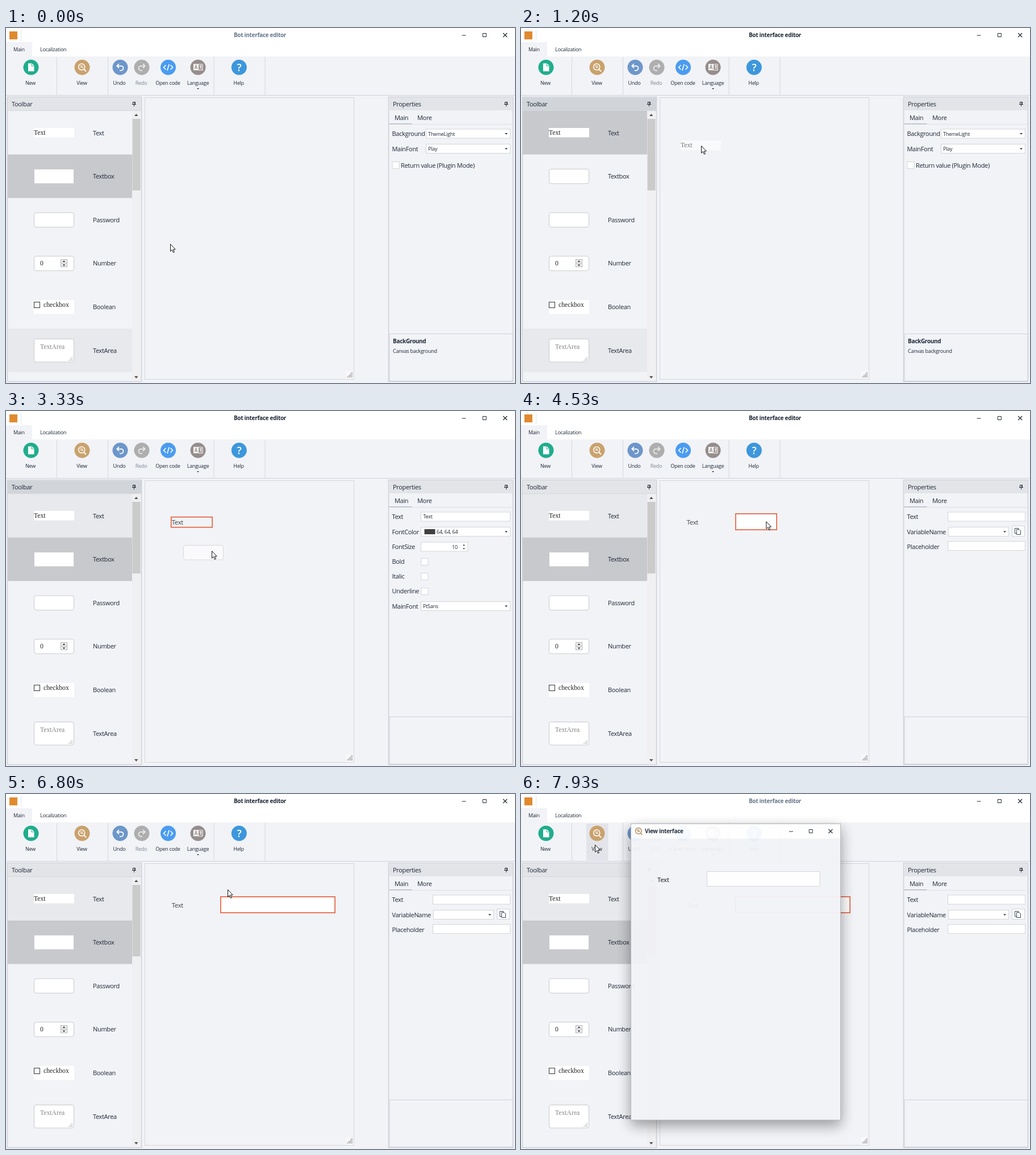
An HTML page that plays this animation: 896x625 px, repeating every 8 s.

```html
<!DOCTYPE html>
<html lang="en">
<head>
<meta charset="utf-8">
<title>Bot interface editor</title>
<style>
html, body { margin: 0; width: 100%; height: 100%; overflow: hidden; background: #f2f3f7; }
svg { display: block; width: 896px; height: 625px; }
text { font: 11px "Open Sans", "Noto Sans", sans-serif; letter-spacing: -.03em; fill: #1e2836; white-space: pre; }
.s { font-size: 9px; }
.b { font-size: 10px; font-weight: 700; }
.m { text-anchor: middle; }
.dim { fill: #66768b; }
.off { fill: #7d8490; }
.serif { font: 11.7px "Liberation Serif", "Times New Roman", serif; letter-spacing: 0; fill: #222; }
.gray { fill: #858585; }
.label { font-size: 11.4px; fill: #404040; }
.win { filter: drop-shadow(0 9px 12px rgba(0, 0, 0, .4)); }
</style>
</head>
<body>
<svg id="stage" viewBox="0 0 896 625"></svg>
<script>
const STEPS = 120, RATE = 15;
const BG = '#f2f3f7', LINE = '#d0d2d9', FIELD = '#d3d5da', ACCENT = '#e56a4b', INK = '#1e2836';

// [step, x, y] of the pointer, [step, x] of the dragged right edge
const pointerPath = [
  [0, 289, 380], [1, 272, 340], [2, 228, 255], [3, 180, 182], [4, 157, 161], [5, 153, 184],
  [9, 153, 184], [11, 169, 188], [15, 280, 203], [18, 317, 207], [22, 322, 207], [27, 327, 203],
  [36, 327, 203], [41, 215, 208], [44, 184, 256], [47, 185, 258], [48, 222, 258], [49, 292, 255],
  [50, 362, 246], [52, 398, 222], [58, 428, 193], [66, 428, 193], [74, 441, 198], [77, 441, 198],
  [79, 452, 198], [87, 559, 199], [90, 571, 199], [93, 578, 200], [95, 576, 208], [99, 500, 198],
  [102, 390, 168], [103, 279, 136], [104, 228, 112], [107, 160, 94], [112, 130, 89]
];
const edgePath = [[79, 451], [87, 558], [90, 570], [93, 580]];

function along(keys, n) {
  const i = keys.findIndex(k => k[0] > n);
  if (i === 0) return keys[0].slice(1);
  if (i < 0) return keys[keys.length - 1].slice(1);
  const a = keys[i - 1], b = keys[i], f = (n - a[0]) / (b[0] - a[0]);
  return a.slice(1).map((v, j) => v + (b[j + 1] - v) * f);
}

const text = (x, y, s, cls = '') => `<text x="${x}" y="${y}" class="${cls}">${s}</text>`;
const fill = (x, y, w, h, c) => `<rect x="${x}" y="${y}" width="${w}" height="${h}" fill="${c}"/>`;
const box = (x, y, w, h, c = '#fff', line = FIELD, r = 0, sw = 1) =>
  `<rect x="${x + .5}" y="${y + .5}" width="${w - 1}" height="${h - 1}" rx="${r}" fill="${c}" stroke="${line}" stroke-width="${sw}"/>`;
const path = (d, c = INK, w = 1, f = 'none') => `<path d="${d}" stroke="${c}" stroke-width="${w}" fill="${f}"/>`;
const shape = (d, c = INK) => path(d, 'none', 0, c);
const disc = (x, c, icon) => `<g transform="translate(${x} 69.3)"><circle r="13.5" fill="${c}"/>${icon}</g>`;
const group = (x, y, s, o = 1) => `<g transform="translate(${x} ${y})" opacity="${o}">${s}</g>`;
const down = (x, y, w = 2.5) => shape(`M${x - w} ${y}h${2 * w}l${-w} ${w}z`);
const up = (x, y, w = 2.5) => shape(`M${x - w} ${y}h${2 * w}l${-w} ${-w}z`);
const pin = x => path(`M${x - 2} 130.5h5M${x - 3} 134.5h7M${x + .5} 135v3M${x - 1.5} 130v4M${x + 1.5} 130v4M${x + 2.2} 130v4`);
const grip = (x, y, n, c) => {
  let s = '';
  for (let i = 0; i < n; i++) for (let j = 0; j <= i; j++) s += fill(x - 2.5 * j, y - 2.5 * (n - 1 - i), 1.3, 1.3, c);
  return s;
};
const combo = (x, y, w, s, indent = 4) => box(x, y, w, 17) + text(x + indent, y + 12, s, 's') + down(x + w - 7.5, y + 7.5);
const check = (x, y) => box(x, y, 13, 13);
const winButtons = (x, y, gap) => path(`M${x - 3.5} ${y + .5}h7M${x + gap - 3} ${y - 3}h6v6h-6z`) +
  path(`M${x + 2 * gap - 3.5} ${y - 3.5}l7 7m0 -7l-7 7`, INK, 1.2);
const lens = path('M3.4 3.6L7 7.2', '#fff', 2) + '<circle cx="-.8" cy="-.8" r="5.5" fill="none" stroke="#fff" stroke-width="1.5"/>' +
  path('M-3.5 -2.5h4.5M-2.5 0h4.5', '#fff', 1.2);
const turn = path('M-5.5 -2.5H1.5A4 4 0 0 1 1.5 5.5H-1', '#fff', 1.8) + path('M-2 -6.2L-5.7 -2.5L-2 1.2', '#fff', 1.8);

function ribbon(n, away) {
  const hot = n >= 108;
  let s = fill(0, 0, 896, 50, '#fff') + fill(0, 25, 46, 25, BG) +
    fill(6, 6, 14, 14, '#e08a2f') + fill(26, 3, 1, 20, '#e3e4e8') +
    text(447, 16, 'Bot interface editor', 'b m' + (away ? ' dim' : '')) + winButtons(806, 12.5, 36.3) +
    text(13, 41, 'Main', 's') + text(60, 41, 'Localization', 's') + fill(0, 118, 896, 1, LINE);
  if (hot) s += fill(115, 52, 38.5, 65, '#e3e4e9');
  for (const x of [89, 179, 365.5, 455.5]) s += fill(x, 51, 1, 67, '#d6d8dd');
  s += disc(44, '#20ad8d', shape('M-5 -7H1.5L5.5 -3V7H-5z', '#fff') + path('M1 -6.5V-2.5H5', '#20ad8d', 1)) +
    disc(134, '#c9a26d', lens) + disc(201, '#6d96ca', turn) +
    disc(239, '#aeaeae', `<g transform="scale(-1 1)" opacity=".75">${turn}</g>`) +
    disc(285.5, '#4a9cf0', path('M-4 -4L-8 0L-4 4M4 -4L8 0L4 4M1.6 -5.5L-1.6 5.5', '#fff', 1.6)) +
    disc(338, '#968d8c', fill(-8, -6, 9, 11, '#fff') + path('M-6 3L-3.5 -4L-1 3M-5 1h3', '#968d8c', 1.2) +
      path('M1 -5.5H8V5H1M2.5 -2.5H7M4.7 -4V-2.5M6 -2Q5 2 2.5 3M3.3 -2Q4.5 2 7 3', '#fff', 1)) +
    disc(410.3, '#3d97dc', '<text y="6.3" class="m" style="font-size:18px;font-weight:600;fill:#fff">?</text>');
  [[43, 'New'], [133.5, 'View'], [199.5, 'Undo'], [238, 'Redo', ' off'], [285, 'Open code'], [338, 'Language'], [409.5, 'Help']]
    .forEach(([x, name, cls = '']) => s += text(x, 100, name, 's m' + cls));
  return s + down(338, 106, 2);
}

function toolbar(n) {
  const active = (n >= 8 && n < 36) || (n >= 45 && n < 66);
  const picked = n >= 8 && n < 45 ? 0 : 1, hover = n < 41 ? 5 : 0;
  const top = i => 146 + 76.65 * i;
  let s = box(2, 121, 237, 502, BG, LINE, 0, 1.6) + fill(3, 122.5, 235, 23, active ? '#d1d5da' : '#e3e4e8') +
    fill(3, 145, 235, 1, '#d5d7dc') + text(10, 137.5, 'Toolbar') + pin(225) +
    fill(3, top(hover), 219, 76.5, '#e8e9ec') + fill(3, top(picked), 219, 76.65, '#c8c9cd') +
    fill(222, 146, 15, 476, '#f0f0f2') + fill(222.5, 160, 14, 126, '#cbcbcb') +
    shape('M226 155h6.5l-3.2 -4z', '#505050') + shape('M226 613h6.5l-3.2 4z', '#505050');
  ['Text', 'Textbox', 'Password', 'Number', 'Boolean', 'TextArea'].forEach((name, i) => s += text(153, 188.5 + 76.65 * i, name));
  s += fill(49, 176, 71, 16.5, '#fff') + text(49, 188, 'Text', 'serif');
  for (let i = 1; i < 4; i++) s += box(49, 171.3 + 76.65 * i, 71, 26.5, '#fff', '#c9cacf', i === picked ? 1 : 3.5);
  s += text(60, 418, '0', 'serif') + box(96, 407, 12, 14, '#efefef', '#b5b5b5') + fill(96, 413.5, 12, 1, '#b5b5b5') +
    up(102, 411.7) + down(102, 416.5) +
    fill(49, 479, 71, 24.5, '#fff') + box(49, 482, 11, 11, '#fff', '#333') + text(66, 491, 'checkbox', 'serif') +
    box(49, 547, 71, 41.5, '#fff', '#c9cacf', 3.5) + text(60, 565, 'TextArea', 'serif gray') + grip(115.5, 584.5, 3, '#999');
  return s;
}

function properties(n) {
  let s = box(673, 121, 220, 502, BG, LINE, 0, 1.6) + fill(674.5, 122.5, 217.5, 22.5, '#e3e4e8') +
    text(681, 137.5, 'Properties') + pin(880) + text(684, 162, 'Main') + text(724, 162, 'More') +
    fill(674.5, 169, 217.5, 1, '#dfe0e5') + fill(674.5, 168, 40, 1.3, '#b4b9c1') +
    box(674.5, 538, 218, 84, BG, LINE);
  const names = list => list.forEach((name, i) => s += text(679.5, 190.3 + 26.2 * i, name));
  const color = combo(730, 204, 158, '64, 64, 64', 28) + fill(736.5, 208, 19, 9, '#404040');
  if (n < 36) s += text(681, 554.5, 'BackGround', 'b') + text(681, 571.5, 'Canvas background', 's');
  if (n < 35) {
    names(['Background', 'MainFont']);
    s += combo(739, 177.5, 149, 'ThemeLight') + combo(739, 204, 149, 'Play') +
      check(679.5, 235) + text(695, 246, 'Return value (Plugin Mode)');
  } else if (n < 36) {
    names(['Text', 'FontColor', 'FontSize', 'Bold']);
    s += combo(739, 177.5, 149, 'ThemeLight') + color;
  } else if (n < 66) {
    names(['Text', 'FontColor', 'FontSize', 'Bold', 'Italic', 'Underline', 'MainFont']);
    s += box(730, 177.5, 158, 17) + text(734.5, 189, 'Text', 's') + color + box(730, 230.5, 83.5, 17) +
      text(785, 243, '10', 's') + up(806, 237, 2) + down(806, 241.5, 2) +
      check(730.5, 259) + check(730.5, 285) + check(730.5, 311) + combo(730, 335, 158, 'PtSans');
  } else {
    names(['Text', 'VariableName', 'Placeholder']);
    s += box(751, 177.5, 137, 17) + combo(752, 204, 107, '') + box(864, 202, 23, 19) + box(751, 229, 137, 17) +
      path('M872.5 215.5H869.5V206.5H875.5V208', '#3a4656') + path('M872.5 208.5H877L879.5 211V217.5H872.5z', '#3a4656', 1, '#fff');
  }
  return s;
}

function canvas(n) {
  let s = box(244, 122, 369, 497, BG, '#d4d6da') + fill(598, 604, 13.5, 13.5, '#f8f8fa') + grip(608.3, 613.6, 4, '#555');
  if (n >= 36) s += text(291.7, 200, 'Text', 'label');
  if (n >= 36 && n < 66) s += box(290.2, 186.2, 73.4, 19, 'none', ACCENT, 0, 1.8);
  if (n >= 66) s += box(377.4, 180.4, along(edgePath, n)[0] - 377.8, 29.2, '#fff', ACCENT, 0, 1.8);
  return s;
}

function ghost(n, [x, y]) {
  if (n >= 11 && n < 35) return group(x - 36, y - 9, fill(0, 0, 71, 17, '#fff') + text(0, 12.2, 'Text', 'serif'), .6);
  if (n >= 47 && n < 66) return group(x - 50, y - 10, box(0, 0, 71, 26.5, '#fff', '#c9cacf', 3.5), .65);
  return '';
}

function preview(n) {
  if (n < 115) return '';
  const opacity = Math.min(.95, .15 + (n - 115) * .2);
  return `<g class="win" opacity="${opacity}">` + box(193, 52, 370, 522.5, BG, '#b4b6bb') + fill(194, 53, 368, 25.5, '#fff') +
    `<circle cx="206.8" cy="65" r="5.3" fill="#fff" stroke="#b88a4e" stroke-width="1.4"/>` +
    path('M204 63.5h4.5M205 66h4.5M210.5 69l3 3', '#b88a4e', 1.3) +
    text(218, 69, 'View interface', 'b') + winButtons(475.5, 65.5, 34.7) +
    `<text x="240" y="154.5" class="label" style="font-size:11px;font-weight:600">Text</text>` +
    box(327, 136, 199.5, 27) + '</g>';
}

const pointer = ([x, y]) => group(x, y, path('M.5 .5V13.2L3.4 10.5L5.4 15.3L7.4 14.4L5.4 9.8H9.2z', '#111', 1, '#fff'));

function scene(n) {
  const p = along(pointerPath, n);
  return ribbon(n, n < 8 || n >= 115) + toolbar(n) + canvas(n) + properties(n) + ghost(n, p) + preview(n) + pointer(p);
}

const stage = document.getElementById('stage');
const start = performance.now();
let shown = -1;
function tick() {
  // small offset keeps rounded times on the right step
  const n = Math.floor((performance.now() - start) * RATE / 1000 + .06) % STEPS;
  if (n !== shown) stage.innerHTML = scene(shown = n);
  requestAnimationFrame(tick);
}
tick();
</script>
</body>
</html>
```
